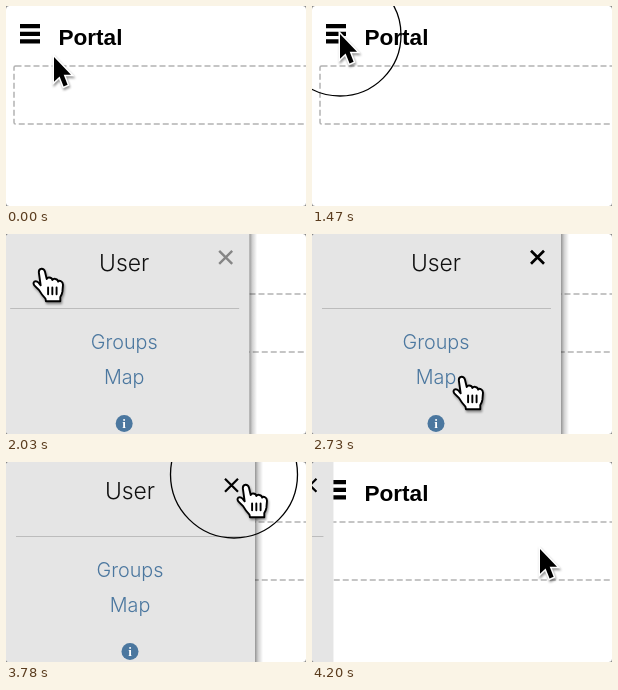
Animation of 300x200 px, one loop 4270 ms. Source, as an HTML page:

```html
<!DOCTYPE html>
<html lang="en">
<head>
<meta charset="utf-8">
<title>Side menu</title>
<style>
  html, body { margin: 0; height: 100%; overflow: hidden; background: #888; }
  svg { display: block; width: 100vw; height: 100vh; }
  .title { font: bold 22.6px "Liberation Sans", Arial, sans-serif; }
  .menu { font: 300 19.8px Inter, "Liberation Sans", sans-serif; text-anchor: middle; fill: #4b779f; }
  .menu .user { font-size: 22.9px; fill: #111; }
  .menu .info { font: bold 13px "Liberation Serif", serif; fill: #fff; }
  .cursor { filter: drop-shadow(1px 2px 1.3px rgba(0, 0, 0, .4)); }
</style>
</head>
<body>
<svg viewBox="0 0 300 200">
  <defs>
    <clipPath id="window"><rect width="300" height="200" rx="3.5"/></clipPath>
    <linearGradient id="fade">
      <stop stop-color="#000" stop-opacity=".42"/>
      <stop offset=".4" stop-color="#000" stop-opacity=".18"/>
      <stop offset="1" stop-color="#000" stop-opacity="0"/>
    </linearGradient>
  </defs>
  <g clip-path="url(#window)">
    <rect width="300" height="200" fill="#fff"/>
    <path d="M14 20.2h20M14 27.8h20M14 35.4h20" stroke="#000" stroke-width="4.3"/>
    <text class="title" x="52.4" y="39.4">Portal</text>
    <rect x="8" y="60" width="320" height="58" rx="1.5" fill="none" stroke="#b2b2b2" stroke-width="1.5" stroke-dasharray="6 3"/>

    <g id="menu" class="menu">
      <rect id="shadow" x="249" width="8" height="200" fill="url(#fade)"/>
      <rect x="-10" width="259" height="200" fill="#e5e5e5"/>
      <path d="M10 74.5H239" stroke="#bcbcbc"/>
      <text class="user" x="124" y="37">User</text>
      <text x="124" y="115">Groups</text>
      <text x="124" y="150">Map</text>
      <circle cx="124" cy="189.5" r="8.5"/>
      <text class="info" x="124" y="194">i</text>
      <path id="close" d="M219 16.8l13 13m0-13l-13 13"/>
    </g>

    <circle id="ring" fill="none" stroke="#000" stroke-width="1.3"/>
    <g id="arrow" class="cursor">
      <path d="M0 0V24.7L5.6 19.5L9.6 29.4L13.6 27.7L9.7 17.8H17Z" stroke="#fff" stroke-width="3" paint-order="stroke"/>
    </g>
    <g id="hand" class="cursor" stroke="#000" stroke-width="1.8" stroke-linejoin="round" stroke-linecap="round">
      <g transform="scale(1.06)">
        <path fill="#fff" d="M8 17L6.3 5Q6 1.6 8.7 1.3Q11.3 1.2 12 4L13.7 11Q14.2 9.5 16 9.6Q18.8 9.8 19 12Q20 10.5 22 11Q24.3 11.5 24.5 13.5Q25.5 12.2 27 13Q29.3 14 29 17L28.5 23Q28 26 26.5 28V32H13L12.5 29.5Q9 26 6.5 21.5L2 17Q.5 15 2 13.5Q4 12.5 6 14.5Z"/>
        <path d="M15 19v6.5M19 19v6.5M23 19v6.5"/>
      </g>
    </g>
  </g>
</svg>
<script>
const LOOP = 4270, STEP = 70, MENU = 249, OPEN = 1612, CLOSE = 3864, SLIDE = 520;

// time, x, y of the pointer's hot spot
const path = [
  [0, 48, 51], [420, 28, 28], [2030, 28, 28], [2100, 32, 30], [2380, 66, 74],
  [2660, 125, 133], [2730, 142, 136], [2800, 150, 137], [3220, 223, 34],
  [3430, 232, 16], [3850, 232, 16], [4200, 228, 87]
];

// start, end, x, y, radius of the click ring
const rings = [
  [560, 630, 28, 29, 4], [630, 700, 28, 29, 23], [700, 840, 28, 29, 42],
  [1470, 1610, 28, 29, 61], [3780, 3850, 228, 12.5, 63.5]
];

const [menu, shadow, close, ring, arrow, hand] =
  ["menu", "shadow", "close", "ring", "arrow", "hand"].map(id => document.getElementById(id));

const set = (el, attrs) => {
  for (const name in attrs) el.setAttribute(name, attrs[name]);
};
const show = (el, on) => set(el, { display: on ? "inline" : "none" });
const place = (el, x, y) => set(el, { transform: `translate(${x} ${y})` });

// CSS "ease": cubic-bezier(.25, .1, .25, 1)
function ease(x) {
  if (x <= 0 || x >= 1) return x <= 0 ? 0 : 1;
  const curve = (u, a, b) => 3 * u * (1 - u) ** 2 * a + 3 * u * u * (1 - u) * b + u ** 3;
  let low = 0, high = 1;
  for (let i = 0; i < 20; i++) {
    const mid = (low + high) / 2;
    if (curve(mid, .25, .25) < x) low = mid; else high = mid;
  }
  return curve(low, .1, 1);
}

function pointerAt(t) {
  const next = path.findIndex(p => p[0] > t);
  if (next < 0) return path[path.length - 1].slice(1);
  const [t0, x0, y0] = path[next - 1], [t1, x1, y1] = path[next];
  const k = (t - t0) / (t1 - t0);
  return [x0 + (x1 - x0) * k, y0 + (y1 - y0) * k];
}

function draw(t) {
  const edge = MENU * (ease((t - OPEN) / SLIDE) - ease((t - CLOSE) / SLIDE));
  place(menu, edge - MENU, 0);
  show(menu, edge > 0);
  show(shadow, t < CLOSE);
  set(close, {
    stroke: t < 2170 ? "#868686" : "#000",
    "stroke-width": t < 2170 ? 2.4 : t < 3780 ? 2.7 : 2.2
  });

  const click = rings.find(([from, to]) => t >= from && t < to);
  show(ring, click);
  if (click) set(ring, { cx: click[2], cy: click[3], r: click[4] });

  const [x, y] = pointerAt(t), overMenu = edge > x;
  show(arrow, !overMenu);
  show(hand, overMenu);
  place(arrow, x, y);
  place(hand, x - 1.8, y + 5.3);
}

function tick() {
  const t = performance.now() % LOOP;
  draw(Math.floor(t / STEP) * STEP);
  requestAnimationFrame(tick);
}
tick();
</script>
</body>
</html>
```
